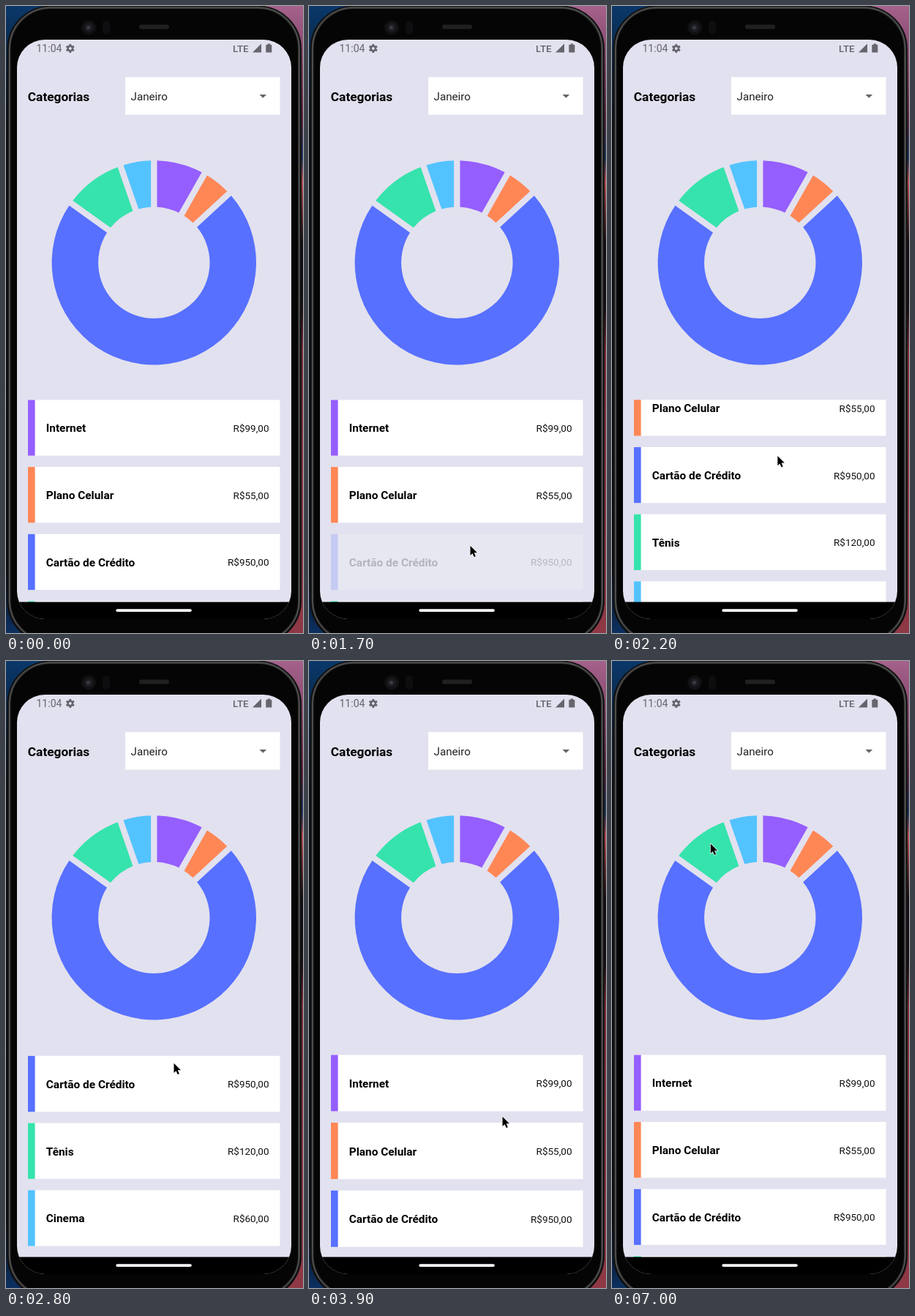
An HTML page that plays this animation: 406 by 857 pixels, repeating every 8 s.

```html
<!DOCTYPE html>
<html lang="pt-BR">
<head>
<meta charset="utf-8">
<title>Categorias</title>
<style>
html, body { margin: 0; width: 100%; height: 100%; overflow: hidden; background: #05070c; }
svg { display: block; width: 100%; height: 100%; font-family: Roboto, sans-serif; }
.name { font-weight: 700; font-size: 15.4px; }
.price { font-size: 13.5px; text-anchor: end; fill: #111; }
.status { font-size: 14px; fill: #66656d; }
</style>
</head>
<body>
<svg viewBox="0 0 406 857">
  <defs>
    <linearGradient id="left" x2="0" y2="1">
      <stop offset="0" stop-color="#0a386a"/>
      <stop offset=".2" stop-color="#0a0d14"/>
      <stop offset=".9" stop-color="#080b12"/>
      <stop offset="1" stop-color="#0c3060"/>
    </linearGradient>
    <linearGradient id="right" x2="0" y2="1">
      <stop offset="0" stop-color="#a5628c"/>
      <stop offset=".18" stop-color="#5a2440"/>
      <stop offset=".24" stop-color="#16365c"/>
      <stop offset=".28" stop-color="#b8484c"/>
      <stop offset=".38" stop-color="#100c11"/>
      <stop offset=".48" stop-color="#140d13"/>
      <stop offset=".55" stop-color="#7d2a38"/>
      <stop offset="1" stop-color="#8f3946"/>
    </linearGradient>
    <clipPath id="screen"><rect x="15" y="46" width="375" height="792" rx="38"/></clipPath>
    <clipPath id="view"><rect x="15" y="538.3" width="375" height="276.7"/></clipPath>
  </defs>

  <rect width="203" height="857" fill="url(#left)"/>
  <rect x="203" width="203" height="857" fill="url(#right)"/>
  <g fill="none">
    <rect x="2.5" y=".5" width="400.5" height="871" rx="58" fill="#050505" stroke="#111" stroke-width="2"/>
    <rect x="5" y="2.5" width="395.5" height="866" rx="56" stroke="#333" stroke-width="3"/>
    <rect x="4.5" y="2" width="396.5" height="867" rx="56" stroke="#606060"/>
  </g>
  <circle cx="113" cy="29.5" r="10" fill="#111113"/>
  <circle cx="113" cy="29.5" r="6" fill="#1c1d22"/>
  <circle cx="112.5" cy="29.5" r="2.5" fill="#3a3b42"/>
  <rect x="132" y="20" width="10" height="19" rx="5" fill="#0e0e10"/>
  <rect x="182" y="25.5" width="41" height="6" rx="3" fill="#202020"/>

  <g clip-path="url(#screen)">
    <rect x="15" y="46" width="375" height="792" fill="#e2e1ef"/>
    <g class="status">
      <text x="41.5" y="63">11:04</text>
      <text x="310" y="62.5" font-weight="500" font-size="13.4">LTE</text>
      <path d="M337 63.5L349 51.5V63.5Z"/>
      <path d="M357.5 51.5h3.6v1.5h2.2v10.5h-8v-10.5h2.2z"/>
      <g id="gear" transform="translate(87.8 58)">
        <circle r="3.2" fill="none" stroke="#66656d" stroke-width="2.6"/>
      </g>
    </g>
    <text x="29.8" y="130" font-size="17.3" font-weight="700">Categorias</text>
    <rect x="163" y="97.2" width="211.5" height="51.3" fill="#fff"/>
    <text x="170.5" y="129.2" font-size="15.2" fill="#222">Janeiro</text>
    <path d="M346.5 121h9.6l-4.8 4.8z" fill="#666"/>
    <g id="pie" transform="translate(202.3 350.8)"></g>
    <g clip-path="url(#view)"><g id="list"></g></g>
    <rect x="15" y="814.6" width="375" height="24" fill="#000"/>
  </g>
  <rect x="150.3" y="824.2" width="103.5" height="3.8" rx="1.9" fill="#fff"/>
  <g id="cursor">
    <path transform="translate(.5 .8) scale(.9)" d="M0 0V14.6L3.3 11.5L5.7 17L8.2 16L5.8 10.5H10.5Z" stroke="#fff" stroke-width="1.5" stroke-linejoin="round" paint-order="stroke"/>
  </g>
</svg>
<script>
const LOOP = 8000, STEP = 100;
const TOP = 538.3, PITCH = 91.75, CARD_H = 76.3, MAX_SCROLL = 182;
const ENTER = 300, PRESS = 1500, UP = [1990, 2338], DOWN = [2868, 3500];
const items = [
  ['Internet', 99, '#955eff'],
  ['Plano Celular', 55, '#ff8756'],
  ['Cartão de Crédito', 950, '#5770ff'],
  ['Tênis', 120, '#36e3ac'],
  ['Cinema', 60, '#53c3ff']
];

// Pointer moves: start, end, destination; it rests in between
const moves = [
  [ENTER, 1100, 201, 647],
  [1100, 1700, 220, 737],
  [...UP, 229, 549],
  [...DOWN, 255, 796],
  [3500, 3900, 264, 622],
  [3900, 4200, 235, 395],
  [4200, 4400, 221, 453],
  [5000, 5400, 118, 262],
  [5400, 5500, 134.3, 249]
];

const $ = id => document.getElementById(id);

// Smooth progress from 0 to 1 between two times
function ease(t, from, to) {
  const p = Math.min(1, Math.max(0, (t - from) / (to - from)));
  return p * p * (3 - 2 * p);
}

function el(parent, tag, attrs, text) {
  const node = document.createElementNS('http://www.w3.org/2000/svg', tag);
  for (const key in attrs) node.setAttribute(key, attrs[key]);
  if (text) node.textContent = text;
  return parent.appendChild(node);
}

function pointer(t) {
  let x = 258, y = 1;
  for (const [from, to, toX, toY] of moves) {
    const p = ease(t, from, to);
    x += (toX - x) * p;
    y += (toY - y) * p;
  }
  return [x, y];
}

function slice(from, to, inner, outer, gap) {
  const point = (r, a) => `${(r * Math.sin(a)).toFixed(2)} ${(-r * Math.cos(a)).toFixed(2)}`;
  const po = Math.asin(gap / outer), pi = Math.asin(gap / inner);
  const large = to - from > Math.PI ? 1 : 0;
  return `M${point(outer, from + po)}A${outer} ${outer} 0 ${large} 1 ${point(outer, to - po)}` +
    `L${point(inner, to - pi)}A${inner} ${inner} 0 ${large} 0 ${point(inner, from + pi)}Z`;
}

function buildPie() {
  const inner = 76.2, outer = 139.7, pad = Math.PI / 60;
  const gap = Math.hypot(inner, outer) * Math.sin(pad / 2);
  const total = items.reduce((sum, item) => sum + item[1], 0);
  const unit = (2 * Math.PI - items.length * pad) / total;
  let angle = 0;
  for (const [, value, fill] of items) {
    const end = angle + value * unit + pad;
    el($('pie'), 'path', { d: slice(angle, end, inner, outer, gap), fill });
    angle = end;
  }
}

function buildCard([name, value, fill], i) {
  const g = el($('list'), 'g', { transform: `translate(30 ${i * PITCH})` });
  el(g, 'rect', { width: 344.5, height: CARD_H, fill: '#fff' });
  el(g, 'rect', { width: 9.6, height: CARD_H, fill });
  el(g, 'text', { x: 24.8, y: 44.2, class: 'name' }, name);
  el(g, 'text', { x: 329.5, y: 43.6, class: 'price' }, `R$${value},00`);
  return g;
}

for (let a = 0; a < 360; a += 60) {
  el($('gear'), 'rect', { x: -1.4, y: -6, width: 2.8, height: 3, transform: `rotate(${a})` });
}
buildPie();
const cards = items.map(buildCard);

function draw(t) {
  const [x, y] = pointer(t);
  const scroll = MAX_SCROLL * (ease(t, ...UP) - ease(t, ...DOWN));
  // Overscroll stretch, springing back
  const stretch = t < DOWN[1] ? 1 : 1 + .04 * Math.exp((DOWN[1] - t) / 300);
  const dim = ease(t, PRESS, PRESS + 200) - ease(t, UP[0], UP[0] + 200);
  $('cursor').setAttribute('transform', `translate(${x} ${y})`);
  $('cursor').setAttribute('visibility', t < ENTER ? 'hidden' : 'visible');
  $('list').setAttribute('transform', `translate(0 ${TOP - scroll}) scale(1 ${t < 4500 ? stretch : 1})`);
  cards[2].setAttribute('opacity', 1 - .8 * dim);
}

let start;
function frame(now) {
  start ??= now;
  draw(Math.floor(((now - start) % LOOP) / STEP) * STEP);
  requestAnimationFrame(frame);
}
draw(0);
requestAnimationFrame(frame);
</script>
</body>
</html>
```
